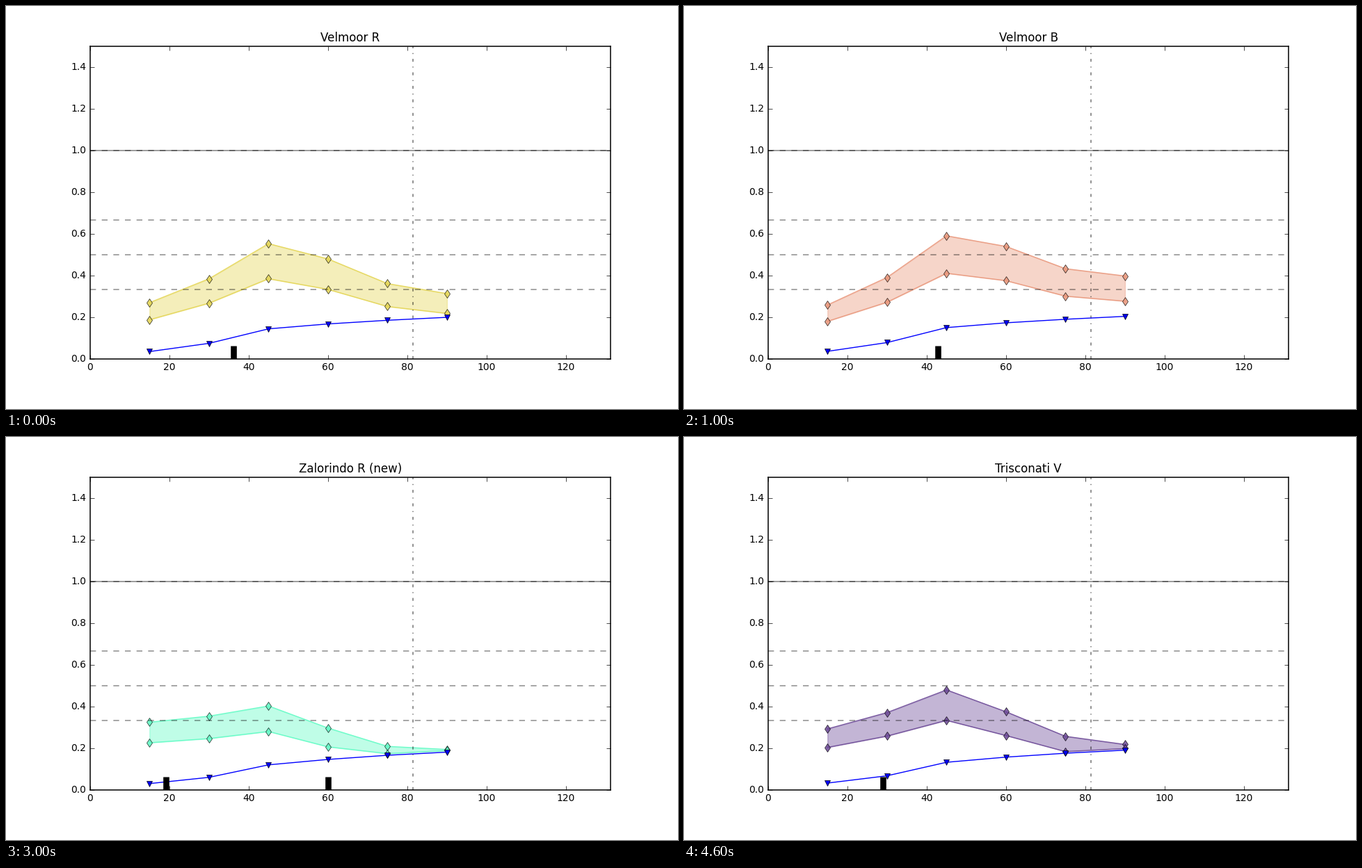
Animation, 966 px wide and 580 px high, one loop 5000 ms. Source, as a matplotlib script:

```python
import numpy as np
import matplotlib.pyplot as plt
from matplotlib.animation import FuncAnimation

plt.style.use("classic")
plt.rcParams.update({
    "font.family": "DejaVu Sans",
    "font.size": 10,
    "axes.linewidth": 1.1,
})

DPI = 100
T = np.arange(15, 91, 15)

# Every panel lies between an early and a late key curve.
PEAK_EARLY = np.array([.324, .353, .402, .296, .208, .193])
PEAK_LATE = np.array([.258, .390, .590, .539, .432, .397])
BASE_EARLY = np.array([.029, .059, .119, .145, .165, .180])
BASE_LATE = np.array([.035, .077, .149, .172, .189, .203])

# title, colour, mix of early (0) and late (1), event times
PANELS = [
    ("Velmoor R", "#e4d553", 0.80, [36.2]),
    ("Velmoor B", "#e9967a", 1.00, [42.8]),
    ("Dorvez-Amilo J", "#aa8cf0", 0.42, [29.1]),
    ("Zalorindo R (new)", "#61fcc5", 0.00, [19.1, 60]),
    ("Trisconati V", "#6b4896", 0.41, [29]),
]

fig = plt.figure(figsize=(966 / DPI, 580 / DPI), dpi=DPI, facecolor="white")
ax = fig.add_axes([0.125, 0.125, 0.775, 0.775])


def curves(mix):
    """Upper edge, lower edge and baseline; late times react later to mix."""
    power = 0.8 + 1.6 * (T / 90) ** 3
    high = PEAK_EARLY + (PEAK_LATE - PEAK_EARLY) * mix ** power
    base = BASE_EARLY + (BASE_LATE - BASE_EARLY) * mix
    low = np.maximum(0.695 * high, base + 0.008)
    return high, low, base


def draw_guides():
    ax.axhline(1, color="k", lw=1.1, alpha=0.5)
    for level in (1 / 3, 1 / 2, 2 / 3, 1):
        ax.axhline(level, color="k", ls="--", lw=1.1, alpha=0.45)
    ax.axvline(81.4, color="k", ls="-.", lw=1.1, alpha=0.55)


def draw(i):
    title, color, mix, events = PANELS[i]
    high, low, base = curves(mix)
    ax.cla()
    ax.fill_between(T, low, high, color=color, alpha=0.4)
    for edge in (high, low):
        ax.plot(T, edge, "d-", color=color, alpha=0.85)
    draw_guides()
    ax.plot(T, base, "bv-")
    for t in events:
        ax.plot([t, t], [0, 0.0615], "k", lw=6.2, solid_capstyle="butt")
    ax.set_title(title)
    ax.set_xlim(0, 131.3)
    ax.set_ylim(0, 1.5)
    ax.set_xticks(range(0, 121, 20))
    ax.set_yticks(np.arange(0, 1.5, 0.2))
    return []


anim = FuncAnimation(fig, draw, frames=len(PANELS), init_func=lambda: [],
                     interval=1000, repeat=True, repeat_delay=0)
plt.show()
```
